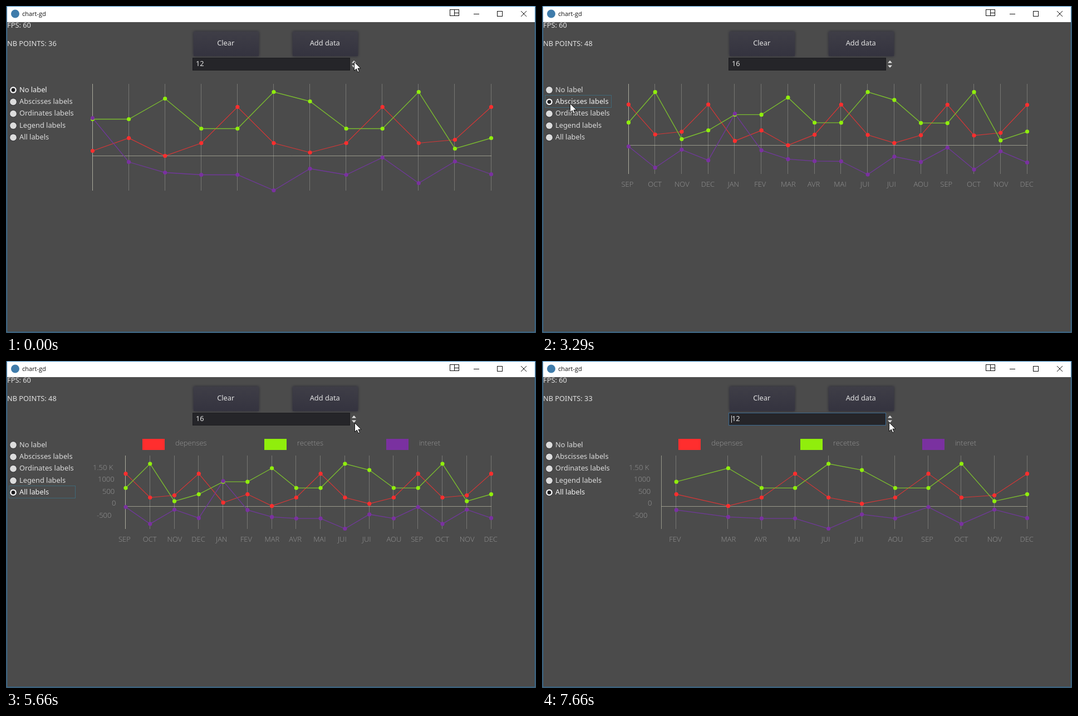
Recreate the animation shown at these times as an HTML page with a canvas. Size 952 by 588 pixels, loop 7.7 s.

```html
<!DOCTYPE html>
<html lang="en">
<head>
<meta charset="utf-8">
<title>chart-gd</title>
<style>
html, body { margin: 0; width: 100%; height: 100%; overflow: hidden; background: #4b4b4b; }
canvas { display: block; width: 952px; height: 588px; }
</style>
</head>
<body>
<canvas id="stage" width="952" height="588"></canvas>
<script>
const ctx = document.getElementById('stage').getContext('2d');
const LOOP = 7700;
const RIGHT = 871;
const UI_FONT = "12.8px 'Noto Sans', 'Open Sans', sans-serif";
const CHART_FONT = "300 13px 'Open Sans', 'Noto Sans', sans-serif";
const MONTHS = 'JAN FEV MAR AVR MAI JUI JUI AOU SEP OCT NOV DEC'.split(' ');
const OPTIONS = ['No label', 'Abscisses labels', 'Ordinates labels', 'Legend labels', 'All labels'];

const SERIES = [
  { name: 'depenses', dot: '#ff2e2e', line: '#d83636', width: 1.2,
    data: [9, 32, 0, 23, 88, 23, 6, 23, 88, 23, 29, 88] },
  { name: 'recettes', dot: '#90ee0c', line: '#7aba30', width: 1.4,
    data: [66, 66, 103, 49, 49, 115, 98, 49, 49, 115, 13, 32] },
  { name: 'interet', dot: '#7a31a0', line: '#70389a', width: 1.3,
    data: [68, -11, -30, -34, -34, -62, -23, -34, -3, -49, -10, -33] }
];

// Times of the clicks, in seconds.
const ADD = 1.339;
const upClick = i => .05 + .15 * i;
const modeClick = i => 2.02 + .7 * i;
const downClick = i => 5.5425 + .5125 * i;

const mix = (a, b, p) => a + (b - a) * p;
const clamp = (v, lo, hi) => Math.min(hi, Math.max(lo, v));
const smooth = p => p * p * (3 - 2 * p);
const circOut = p => Math.sqrt(1 - (1 - clamp(p, 0, 1)) ** 2);
const crisp = v => Math.floor(v) + .5;
const rowY = i => 151 + i * 21.35;

// One chart layout: start time, range of visible points, label mode.
function layout(t, first, last, mode, dur = .4) {
  const left = mode === 2 || mode === 4 ? 214.5 : 155;
  const top = mode >= 3 ? 170 : 140;
  const bottom = mode === 1 || mode === 4 ? 302 : 332;
  const scale = (bottom - top - 16) / 176;
  return { t, first, last, mode, dur, left, top, bottom, scale, zero: bottom - 1 - 62 * scale };
}

const states = [layout(-5, 0, 11, 0), layout(ADD, 8, 23, 0, .54)];
for (let i = 1; i <= 4; i++) states.push(layout(modeClick(i), 8, 23, i));
for (let i = 1; i <= 4; i++) states.push(layout(downClick(i), 9 + i, 23, 4));

// Places where the pointer comes to rest.
const stops = [[0, 625, 100], [1.25, 598, 73], [2.08, 573, 117], [3.9, 47, 249], [5.6, 626, 111], [5.95, 623, 110]];
for (let i = 1; i <= 4; i++) stops.push([modeClick(i), 50, rowY(i)]);
stops.sort((a, b) => a[0] - b[0]);

function spinValue(t) {
  let v = 12;
  for (let i = 1; i <= 4; i++) v += (t >= upClick(i)) - (t >= downClick(i));
  return v;
}

function focusAt(t) {
  if (t < upClick(1)) return '';
  if (t < ADD) return 'field';
  if (t < modeClick(1)) return 'add';
  return t < downClick(1) ? 'radio' : 'field';
}

function blend(a, b, p) {
  return { x: mix(a.x, b.x, p), ys: a.ys.map((y, i) => mix(y, b.ys[i], p)), r: mix(a.r, b.r, p) };
}

// Position of point n at time t, following its moves up to state k.
function place(n, k, t) {
  const s = states[k], i = n - s.first;
  const goal = {
    x: mix(s.left, RIGHT, i / (s.last - s.first)),
    ys: SERIES.map(q => s.zero - q.data[n % 12] * s.scale),
    r: 3.6
  };
  if (k === 0) return goal;
  let from;
  if (n <= states[k - 1].last) {
    from = place(n, k - 1, s.t);
  } else {
    from = { x: 879, ys: SERIES.map(() => 339.5), r: 7.5 };
    if (n === s.last) from = blend(from, goal, .24);
  }
  return blend(from, goal, circOut((t - s.t - Math.sqrt(i) / 10) / s.dur));
}

function text(str, x, y, color = '#e2e2e2', align = 'left', font = UI_FONT) {
  ctx.font = font;
  ctx.fillStyle = color;
  ctx.textAlign = align;
  ctx.fillText(str, x, y);
}

function path(pts, close) {
  ctx.beginPath();
  pts.forEach(([x, y]) => ctx.lineTo(x, y));
  if (close) ctx.closePath();
}

function stroke(pts, color, width = 1) {
  path(pts);
  ctx.strokeStyle = color;
  ctx.lineWidth = width;
  ctx.stroke();
}

function disc(x, y, r, color) {
  ctx.beginPath();
  ctx.arc(x, y, r, 0, Math.PI * 2);
  ctx.fillStyle = color;
  ctx.fill();
}

function rect(x, y, w, h, color) {
  ctx.fillStyle = color;
  ctx.fillRect(x, y, w, h);
}

function frame(x, y, w, h, color) {
  ctx.strokeStyle = color;
  ctx.lineWidth = 1;
  ctx.strokeRect(x + .5, y + .5, w - 1, h - 1);
}

function drawWindow() {
  const ink = '#111';
  rect(0, 0, 952, 588, '#4b4b4b');
  rect(1, 0, 950, 29, '#ffffff');
  frame(1, 0, 950, 587, '#2a7ab5');
  disc(16.5, 14, 7.5, '#3f7cab');
  text('chart-gd', 29, 18, ink, 'left', "11px 'Open Sans', 'Noto Sans', sans-serif");
  frame(797, 6, 17, 12, ink);
  stroke([[805.5, 6], [805.5, 18]], ink);
  stroke([[805, 12.5], [814, 12.5]], ink);
  stroke([[840, 14.5], [850, 14.5]], ink);
  frame(882, 9, 10, 10, ink);
  stroke([[925, 9], [935, 19]], ink);
  stroke([[935, 9], [925, 19]], ink);
}

function button(label, x, focused) {
  const g = ctx.createLinearGradient(0, 45, 0, 91);
  g.addColorStop(0, '#3f3e47');
  g.addColorStop(1, '#34333f');
  ctx.save();
  ctx.shadowColor = 'rgba(28,27,44,.75)';
  ctx.shadowBlur = 5;
  rect(x + 2, 46, 117, 44, g);
  ctx.restore();
  if (focused) frame(x + 1, 45, 119, 45, '#3d678a');
  text(label, x + 59.7, 71, '#e4e4e4', 'center');
}

function spinArrow(y, dir) {
  path([[621, y], [625, y + 4.5 * dir], [629, y]], true);
  ctx.fillStyle = '#e0e0e0';
  ctx.fill();
}

function drawControls(t, state) {
  const focus = focusAt(t);
  text('FPS: 60', 2, 39);
  text('NB POINTS: ' + (state.last - state.first + 1) * 3, 2, 72);
  button('Clear', 335, false);
  button('Add data', 513, focus === 'add');

  rect(335, 93, 283, 23, '#252529');
  frame(335, 93, 283, 23, focus === 'field' ? '#3b6a91' : '#1d1d20');
  text(String(spinValue(t)), 341, 108);
  if (focus === 'field') rect(340, 98, 1, 13, '#d8d8d8');
  spinArrow(102.5, -1);
  spinArrow(106.5, 1);

  OPTIONS.forEach((label, i) => {
    const y = rowY(i), on = i === state.mode;
    if (on && focus === 'radio') frame(5, Math.round(y - 12), 120, 23, '#3f6877');
    disc(13, y, 6.8, '#353538');
    disc(13, y, 5.9, on ? '#f2f2f2' : '#dcdcdc');
    if (on) disc(13, y, 3.4, '#1c1c1e');
    text(label, 24, Math.round(y + 3.6), on ? '#f4f4f4' : '#dcdcdc');
  });
}

function drawChart(t, k) {
  const s = states[k], pts = [];
  for (let n = s.first; n <= s.last; n++) pts.push({ n, ...place(n, k, t) });
  const gridX = x => x > RIGHT ? RIGHT + (x - RIGHT) * .4 : x;
  const end = gridX(pts[pts.length - 1].x);

  for (const p of pts) {
    const x = crisp(gridX(p.x));
    stroke([[x, s.top], [x, s.bottom]], 'rgba(235,235,225,.27)');
  }
  const axis = 'rgba(215,215,190,.55)';
  const axisY = Math.round(s.zero + .4) + .5;
  stroke([[crisp(s.left), s.top], [crisp(s.left), s.bottom]], axis);
  stroke([[s.left, axisY], [end + 1, axisY]], axis);

  const at = (p, i) => [p.x + .5, p.ys[i] + .5];
  SERIES.forEach((q, i) => stroke(pts.map(p => at(p, i)), q.line, q.width));
  SERIES.forEach((q, i) => pts.forEach(p => disc(...at(p, i), p.r, q.dot)));

  const label = (str, x, y) => text(str, x, y, '#949494', 'left', CHART_FONT);
  if (s.mode === 1 || s.mode === 4) {
    pts.forEach(p => label(MONTHS[p.n % 12], p.x - 12.5, 325));
  }
  if (s.mode === 2 || s.mode === 4) {
    [['-500', 163], ['0', 190], ['500', 173], ['1000', 165], ['1.50 K', 156]].forEach(([str, x], i) =>
      label(str, x, Math.round(s.zero + .3 - (i - 1) * 32.7 * s.scale)));
  }
  if (s.mode >= 3) {
    SERIES.forEach((q, i) => {
      const x = s.left + 30.5 + i * (RIGHT - s.left) / 3;
      rect(Math.round(x), 140, 40, 20, q.dot);
      label(q.name, x + 59, 152);
    });
  }
}

function pointer(t) {
  let [, x, y] = stops[0];
  for (const [end, sx, sy] of stops.slice(1)) {
    const travel = .15 + Math.hypot(sx - x, sy - y) / 1500;
    const p = smooth(clamp((t - end) / travel + 1, 0, 1));
    if (p < 1) return [mix(x, sx, p), mix(y, sy, p)];
    [x, y] = [sx, sy];
  }
  return [x, y];
}

function drawCursor(t) {
  const [x, y] = pointer(t);
  if (x > 335 && x < 617 && y > 94 && y < 119) {
    const m = crisp(x), color = '#b4b4b4';
    stroke([[m, y - 6.5], [m, y + 6.5]], color);
    for (const dy of [-6.5, 6.5]) stroke([[m - 3, y + dy], [m + 3, y + dy]], color);
    return;
  }
  const arrow = [[0, 0], [0, 16], [3.8, 12.5], [6.3, 18.3], [8.9, 17.2], [6.4, 11.6], [11.6, 11.6]];
  path(arrow.map(([a, b]) => [x + a + .5, y + b + .5]), true);
  ctx.fillStyle = '#fff';
  ctx.fill();
  ctx.strokeStyle = '#111';
  ctx.lineWidth = 1;
  ctx.stroke();
}

function draw(ms) {
  const t = (ms % LOOP) / 1000;
  const k = states.filter(s => s.t <= t).length - 1;
  drawWindow();
  drawControls(t, states[k]);
  drawChart(t, k);
  drawCursor(t);
}

const start = performance.now();
function tick(now) {
  draw(Math.max(0, now - start));
  requestAnimationFrame(tick);
}
draw(0);
requestAnimationFrame(tick);
</script>
</body>
</html>
```
